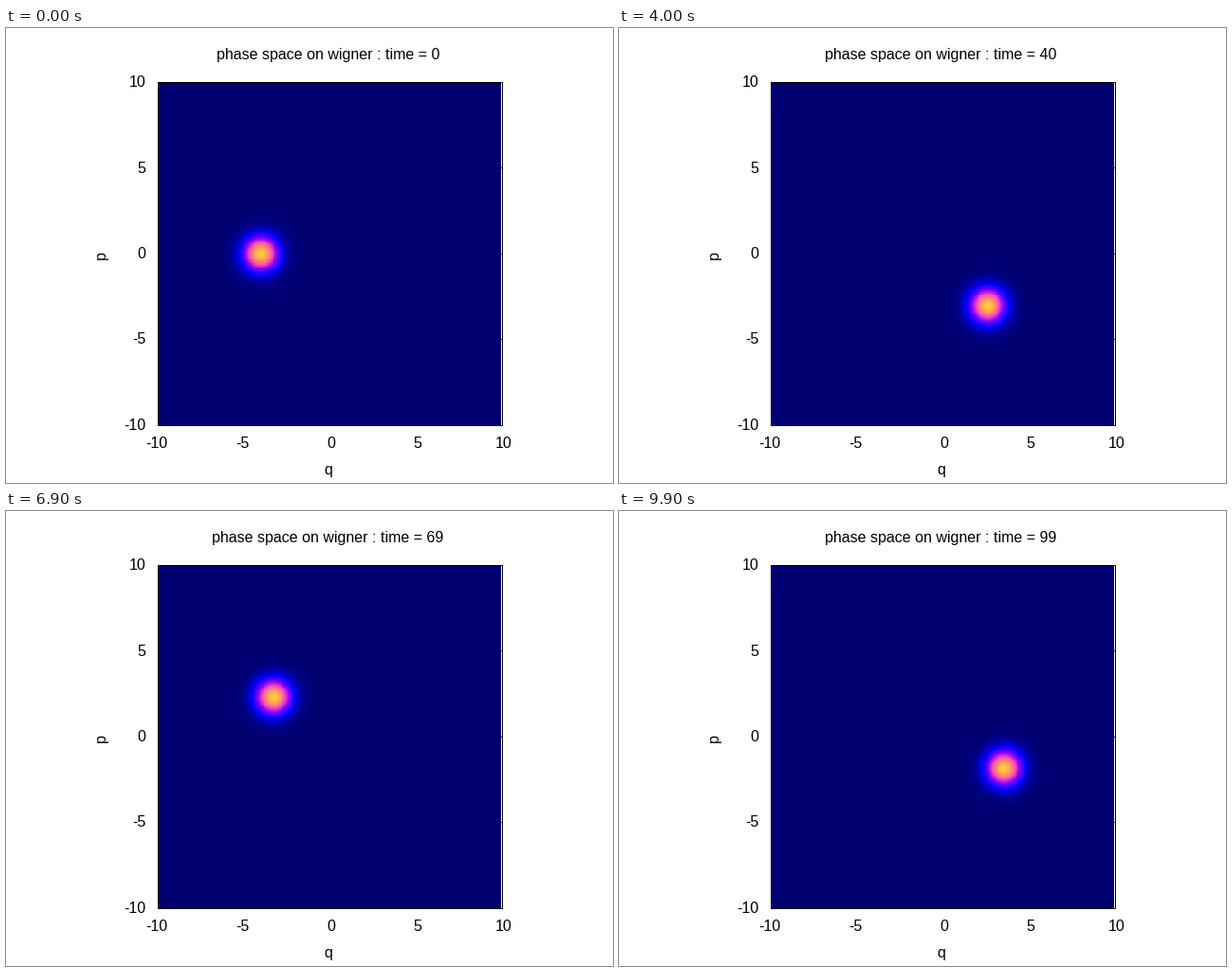
Write a matplotlib script that moves like this. It is 640x480 px and loops after 10000 ms.

```python
import numpy as np
import matplotlib.pyplot as plt
from matplotlib.animation import FuncAnimation
from matplotlib.colors import ListedColormap
from matplotlib.patches import Rectangle

W, H, DPI = 640, 480, 100
FRAMES, INTERVAL = 100, 100
PX = 16                       # font size in pixels
DIGIT, MINUS = 0.556 * PX, 0.333 * PX
TITLE = "phase space on wigner : time = "
TITLE_W = 14.146 * PX

plt.rcParams["font.family"] = "Liberation Sans"
plt.rcParams["font.size"] = PX * 72 / DPI

# black - blue - violet - yellow - white
x = np.linspace(0, 1, 1024)
blue = np.select([x < 0.25, x < 0.42, x < 0.92],
                 [4 * x, 1 + 0 * x, 1.84 - 2 * x], x / 0.08 - 11.5)
ramp = np.column_stack([x / 0.32 - 0.78125, 2 * x - 0.84, blue]).clip(0, 1)
cmap = ListedColormap(ramp)

fig = plt.figure(figsize=(W / DPI, H / DPI), dpi=DPI, facecolor="white")
ax = fig.add_axes([0, 0, 1, 1])
ax.axis("off")

grid = -10 + 0.1 * np.arange(200)
q, p = np.meshgrid(grid, grid)


def wigner(t):
    """Coherent state circling in phase space."""
    q0, p0 = -4 * np.cos(0.1 * t), 4 * np.sin(0.1 * t)
    return np.exp(-(q - q0) ** 2 - (p - p0) ** 2) / np.pi


def advance(s):
    return sum(MINUS if c == "-" else DIGIT for c in s)


def label(x, y, s, **kw):
    return ax.text(x, y, s, color="black", **kw)


field = ax.imshow(wigner(0), cmap=cmap, vmin=-0.05, vmax=0.4, origin="lower",
                  extent=(159, 522, 420, 58), interpolation="nearest",
                  aspect="auto")
ax.set_xlim(0, W)
ax.set_ylim(H, 0)
field.set_clip_path(Rectangle((160, 57), 363, 363, transform=ax.transData))

line = dict(color="black", lw=72 / DPI, snap=False)
ax.add_patch(Rectangle((160.5, 57.5), 363, 362, fill=False, zorder=3, **line))
for y in (147.5, 238.5, 328.5):
    ax.plot([522, 523], [y, y], solid_capstyle="butt", **line)

for v in range(-10, 11, 5):
    s = str(v)
    pad = 0 if v < 0 else 0.139 * PX
    label(159 + 18.15 * (v + 10) - advance(s) / 2 + pad, 443, s)
    label(147.5 - advance(s), round(238 - 18.1 * v) + 5, s)
label(340, 467, "q", ha="center", va="center")
label(100.5, 239.5, "p", ha="center", va="center", rotation=90)
title = label(0, 33, "")


def update(t):
    s = str(t)
    title.set_text(TITLE + s)
    title.set_x(339.5 - (TITLE_W + advance(s)) / 2)
    field.set_data(wigner(t))
    return field, title


anim = FuncAnimation(fig, update, frames=FRAMES, interval=INTERVAL,
                     repeat=True, repeat_delay=0, blit=False)
plt.show()
```
